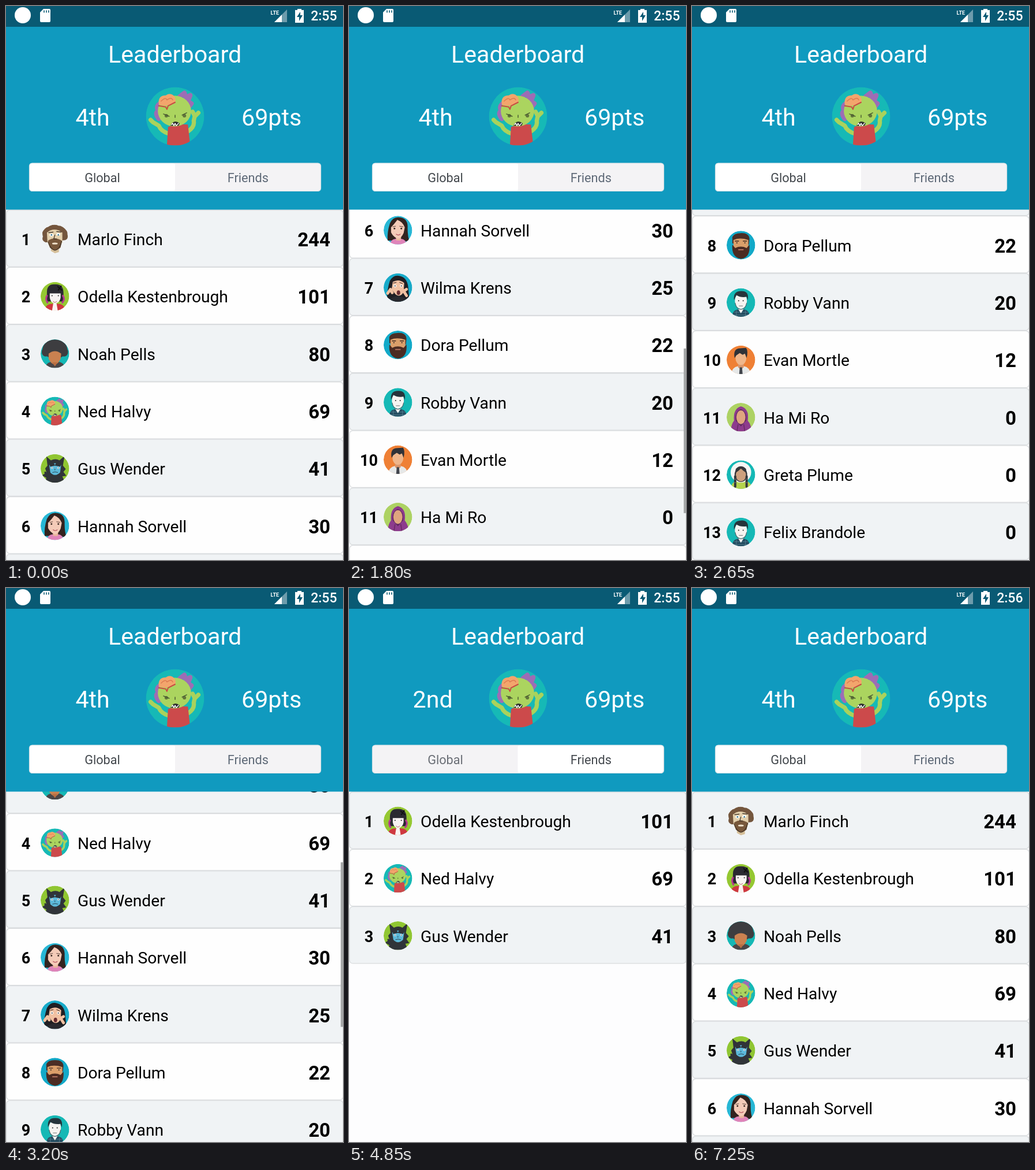
Write an HTML page that moves like this. It is 584 px wide and 959 px high and loops after 8000 ms.

```html
<!DOCTYPE html>
<html lang="en">
<head>
<meta charset="utf-8">
<title>Leaderboard</title>
<style>
  html, body { margin: 0; width: 100%; height: 100%; overflow: hidden; background: #fdfdfe; }
  svg { display: block; width: 584px; height: 959px; font-family: Roboto, sans-serif; }
  .big { font-size: 41.2px; fill: #fff; }
  .tab { font-size: 21.7px; text-anchor: middle; }
  .name { font-size: 28.2px; }
  .rank { font-size: 27px; font-weight: 700; text-anchor: middle; }
  .score { font-size: 33px; font-weight: 700; text-anchor: end; }
</style>
</head>
<body>
<svg id="stage" viewBox="0 0 584 959"></svg>
<script>
const TOP = 352.5, PITCH = 99.3, VIEW = 959 - TOP, LOOP = 8000;

const oval = (x, y, rx, ry, fill) => `<ellipse cx="${x}" cy="${y}" rx="${rx}" ry="${ry}" fill="${fill}"/>`;
const shape = (d, fill) => `<path d="${d}" fill="${fill}"/>`;
const line = (d, color, width) =>
  `<path d="${d}" fill="none" stroke="${color}" stroke-width="${width}" stroke-linecap="round" stroke-linejoin="round"/>`;
const box = (x, y, w, h, fill, extra = '') =>
  `<rect x="${x}" y="${y}" width="${w}" height="${h}" fill="${fill}" ${extra}/>`;
const label = (x, y, cls, text, extra = '') => `<text x="${x}" y="${y}" class="${cls}" ${extra}>${text}</text>`;
const disc = fill => oval(25, 25, 25, 25, fill);
const eyes = (x1, x2, y, fill = '#222', r = 1) => oval(x1, y, r, r, fill) + oval(x2, y, r, r, fill);

// Avatars live in a 50 x 50 box.
const checkedShirt = disc('#15b8b5') + shape('M10 50Q10 38 20 37L30 37Q40 38 40 50Z', '#244c60') +
  line('M13 42H37M13 47H37M17 39V50M33 39V50', '#5d8797', .8) + shape('M20 36L30 36 25 44Z', '#f4f4f2') +
  oval(25, 22, 10.5, 14, '#f6f4f1') + shape('M13 21Q11 5 25 5Q40 4 37 21L35 15Q25 17 17 12Z', '#27343b') +
  line('M15 26Q17 37 25 37Q33 37 35 26', '#53636a', 1.2) + eyes(21, 29, 22) + line('M22 31H28', '#777', 1);

const avatars = {
  wild: shape('M4 21Q0 5 13 4Q22 -3 32 2Q47 0 47 17Q49 25 43 27L9 31Q1 28 4 21Z', '#74563d') +
    shape('M18 35H32V48L25 50 18 46Z', '#d5bf99') + shape('M11 14Q24 3 38 14L38 31Q33 43 25 44Q16 43 12 31Z', '#e3d0ac') +
    shape('M13 28Q24 20 37 28L35 40Q25 49 16 40Z', '#78583b') + oval(25, 33, 5, 1.7, '#eee0c9') +
    oval(19, 18, 3.4, 2.4, '#fff') + oval(31, 17, 3.4, 2.4, '#fff') + eyes(19, 31, 18, '#256c86', 1.3) +
    line('M14 14L22 13M28 12L36 13M25 18L23 25H28M13 30Q17 43 25 45Q34 43 37 29', '#332820', 1.1),
  bob: disc('#95c832') + shape('M11 34V18Q11 3 25 4Q40 3 40 19V34Z', '#2b2a31') +
    line('M11 24Q8 30 12 36M39 24Q43 30 38 36', '#b83791', 3) + shape('M7 50Q8 38 21 38H30Q42 38 43 50Z', '#cf3840') +
    shape('M16 17H35V27Q34 36 25 38Q17 36 16 27Z', '#f8f3f2') + shape('M15 20V12H36V20Z', '#2b2a31') +
    shape('M20 50L22 38Q25 33 28 38L30 50Z', '#faf4f2') + eyes(20, 31, 24) + line('M22 34L25 36 28 34', '#bd5f69', 1) +
    line('M30 8L37 14M36 7L31 14', '#111', 2),
  afro: disc('#15b8b5') + shape('M8 50Q10 39 22 39H30Q41 40 43 50Z', '#4a4648') + oval(25, 17, 21.5, 16.5, '#3d3d40') +
    oval(9, 22, 7, 8, '#3d3d40') + oval(41, 22, 7, 8, '#3d3d40') +
    shape('M14 25Q25 16 36 25L35 34Q30 44 25 44Q18 43 14 34Z', '#ca8150') + shape('M20 40H30L25 47Z', '#b96f42'),
  zombie: disc('#16b9b6') + line('M12 14Q8 17 11 20Q7 22 11 27M29 8L33 5 34 9 38 7 36 12 39 14 36 18', '#9d6db5', 4) +
    line('M20 40Q13 38 11 33L6 30M36 38Q42 34 41 29L42 24M42 25L45 22M42 25L40 21M6 30L4 28', '#a9d25c', 3.6) +
    shape('M19 34Q27 31 36 32L38 50H18Z', '#cc4a4b') + oval(24.5, 20.5, 14.3, 13.2, '#abd45f') +
    shape('M11 15Q10 7 17 7Q22 4 25 9Q27 13 21 15L16 16Z', '#f3a56c') +
    line('M13 12Q17 8 18 11Q22 8 23 11', '#dd7c51', .7) + line('M11 16L17 17 18 19 19 16 25 13', '#c94c43', 1) +
    eyes(17.5, 33, 24.5, '#62753b', 1.5) + line('M15 23L20 25M31 24L35 22M25 24V26', '#485931', .7) +
    shape('M21 33Q24 27 29 31L28 33Z', '#2c2d2d') + line('M22 32L23 31 24 33 25 31 26 33 28 31', '#fff', .7),
  wolf: disc('#90c632') + shape('M7 50L11 39 4 37 10 31 8 25 12 20 10 4 18 11Q26 7 33 11L42 3 39 20 44 26 40 31 45 38 38 39 43 50Z', '#303439') +
    shape('M15 19Q25 13 36 19L34 32Q25 41 17 32Z', '#5cb9d9') + shape('M15 18L21 13 25 19 29 13 36 19 34 22 25 20 17 22Z', '#303439') +
    eyes(20, 31, 24, '#fff', 1.8) + eyes(20, 31, 24, '#222', .8) + line('M21 32Q25 30 30 32M25 26V28', '#294657', 1) +
    line('M8 32L14 42M5 37L12 41', '#303439', 3),
  long: disc('#27b7d5') + shape('M7 43Q6 28 11 13Q17 0 30 3Q43 5 42 22Q42 37 46 46L34 43H15Z', '#33231f') +
    shape('M11 50Q12 41 21 40H31Q39 41 40 50Z', '#df84b9') + shape('M21 34H31L30 43H22Z', '#eab69e') +
    shape('M13 20Q18 15 24 7Q33 10 37 20L35 30Q31 39 25 40Q17 37 13 29Z', '#f4cbb8') +
    eyes(19, 31, 22, '#3b2923', 1.5) + line('M16 19L21 18M28 18L34 19', '#49322b', .9) + line('M22 32Q26 35 29 32', '#b95863', 1.3),
  shout: disc('#17aac9') + shape('M6 45Q6 28 11 13Q18 1 29 5Q41 8 43 24L45 46Z', '#201f23') +
    shape('M9 50Q13 40 25 40Q38 41 42 50Z', '#292a2f') + shape('M16 15Q27 9 36 17L35 33Q29 43 21 37L14 28Z', '#f1c1a2') +
    line('M7 35L12 28 15 34M40 39L35 31 40 28', '#f1c1a2', 5) + eyes(20, 31, 22, '#fff', 2.5) + eyes(20, 31, 22) +
    oval(26, 34, 3, 4, '#682c30') + line('M17 17L22 16M28 16L33 18', '#2c2020', 1),
  beard: disc('#12a9c8') + shape('M10 22V11Q13 4 24 4Q39 3 40 14L39 24Z', '#4b2e25') +
    shape('M12 16Q23 11 38 16V33H12Z', '#db9f6a') + shape('M10 24L15 30Q25 25 35 30L40 24Q42 47 25 49Q8 46 10 24Z', '#4b2b22') +
    eyes(18, 32, 21) + line('M15 18H21M29 18H35', '#412820', 1.4) + line('M21 33H29', '#bd7865', 1.8),
  checked: checkedShirt,
  tie: disc('#ef8035') + shape('M8 50Q9 38 20 36H30Q41 38 42 50Z', '#e6e8e8') + shape('M20 29H30V38L25 42 20 38Z', '#d8966d') +
    oval(25, 22, 9.5, 12, '#efb68b') + shape('M14 22Q11 7 21 5L34 4Q38 9 35 22L32 14 28 16 23 13 17 17Z', '#303237') +
    shape('M23 38H27L28 50H22Z', '#41454c'),
  hood: disc('#add263') + shape('M7 50Q8 37 13 31Q11 10 25 6Q40 10 37 31Q43 38 44 50Z', '#8d3b8d') +
    shape('M16 31Q14 15 25 11Q36 15 34 31L25 41Z', '#5f285e') + oval(25, 25, 8, 12, '#dfa47f') +
    line('M20 38L18 50M30 38L32 50', '#672960', 1.5),
  braids: disc('#15b8b5') + shape('M7 50Q9 36 20 36H31Q42 36 45 50Z', '#b4d34d') +
    oval(25, 21, 18, 18, '#f6f6f4') + oval(25, 25, 11, 13, '#34363a') + oval(25, 26, 9, 11, '#cda07d') +
    shape('M15 22Q23 18 25 13Q27 18 35 22L34 15Q25 6 16 15Z', '#34363a') +
    line('M15 28V46M35 28V46', '#34363a', 4) + line('M13 33H17M33 33H37M13 39H17M33 39H37', '#727277', 1)
};
const avatar = (look, x, y, scale) =>
  `<g transform="translate(${x} ${y}) scale(${scale})" clip-path="url(#round)">${avatars[look]}</g>`;

const players = [
  ['Marlo Finch', 244, 'wild'], ['Odella Kestenbrough', 101, 'bob'], ['Noah Pells', 80, 'afro'],
  ['Ned Halvy', 69, 'zombie'], ['Gus Wender', 41, 'wolf'], ['Hannah Sorvell', 30, 'long'],
  ['Wilma Krens', 25, 'shout'], ['Dora Pellum', 22, 'beard'], ['Robby Vann', 20, 'checked'],
  ['Evan Mortle', 12, 'tie'], ['Ha Mi Ro', 0, 'hood'], ['Greta Plume', 0, 'braids'], ['Felix Brandole', 0, 'checked']
];
const friends = [1, 3, 4].map(i => players[i]);

const row = ([name, score, look], i) => `<g transform="translate(0 ${TOP + i * PITCH})">` +
  box(.7, .5, 583.6, 98.3, i % 2 ? '#fefefe' : '#f0f3f5', 'rx="6" stroke="#d9dcde" stroke-width="1.3"') +
  label(34.5, 61.5, 'rank', i + 1) + avatar(look, 60, 26, .99) +
  label(124, 61.5, 'name', name) + label(562, 63.5, 'score', score) + '</g>';

const stage = document.getElementById('stage');
stage.innerHTML = `<defs><clipPath id="round"><circle cx="25" cy="25" r="25"/></clipPath></defs>` +
  box(0, 0, 584, 959, '#fdfdfe') +
  `<g id="global">${players.map(row).join('')}</g><g id="friends">${friends.map(row).join('')}</g>` +
  box(580, TOP, 4, VIEW * VIEW / (PITCH * players.length), '#a6a8a9', 'id="bar"') +
  box(0, 0, 584, TOP, '#109abf') + box(0, 0, 584, 36, '#095a74') +
  // status bar
  oval(29, 16, 14, 14, '#fff') +
  shape('M65 5H75Q77 5 77 7V26Q77 28 75 28H61Q59 28 59 26V11Z', '#fff') +
  line('M66 8V11M70 8V11M74 8V11', '#095a74', 1.6) +
  label(458.5, 14.5, '', 'LTE', 'font-size="9" font-weight="700" fill="#fff"') +
  shape('M487 6V28H465Z', '#6d9cac') + shape('M478 15V28H465Z', '#fff') +
  shape('M505 5H512V7H516V29H501V7H505Z', '#fff') + shape('M510 10L504 19H508V26L514 16H510Z', '#095a74') +
  label(573.5, 25, '', '', 'id="clock" font-size="23" font-weight="500" text-anchor="end" fill="#fff"') +
  // header
  label(292.7, 98, 'big', 'Leaderboard', 'text-anchor="middle"') +
  label(179.7, 207, 'big', '', 'id="place" text-anchor="end"') + label(408, 207, 'big', '69pts') +
  avatar('zombie', 242.5, 140.5, 2.02) +
  box(40.5, 272, 505, 48.5, '#f4f3f5', 'rx="5"') +
  box(41, 272, 252, 48.5, '#fff', 'id="active" rx="4"') +
  box(40.5, 272, 505, 48.5, 'none', 'rx="5" stroke="#d9e3e7" stroke-width="1.2"') +
  label(167, 305, 'tab', 'Global', 'id="tabGlobal"') + label(419.3, 305, 'tab', 'Friends', 'id="tabFriends"');

const el = Object.fromEntries([...stage.querySelectorAll('[id]')].map(n => [n.id, n]));
const rows = el.global.children;
const maxScroll = PITCH * players.length - VIEW;
const clamp = v => Math.min(1, Math.max(0, v));
const ramp = (t, from, to) => clamp((t - from) / (to - from));
const easeInOut = p => p < .5 ? 2 * p * p : 1 - 2 * (1 - p) ** 2;

// Pressed rows dim at once and recover over 250 ms after release.
const pressed = (t, down, up) => t < down ? 1 : .2 + .8 * easeInOut(ramp(t, up, up + 250));

function scrollAt(t) {
  if (t < 3000) return maxScroll * (1 - (1 - ramp(t, 1600, 2030)) ** 2.2);
  return maxScroll * (1 - ramp(t, 3000, 3300) ** 1.18);
}

function barOpacity(t) {
  if (t > 1600 && t < 2450) return 1 - ramp(t, 2250, 2450);
  if (t > 3000 && t < 3850) return 1 - ramp(t, 3600, 3850);
  return 0;
}

function render(now) {
  const t = Math.floor(now % LOOP / 50) * 50;
  const isFriends = t >= 3950 && t < 7250;
  const scroll = scrollAt(t);

  el.global.style.display = isFriends ? 'none' : '';
  el.friends.style.display = isFriends ? '' : 'none';
  el.global.setAttribute('transform', `translate(0 ${-scroll})`);
  rows[4].style.opacity = pressed(t, 1600, 1650);
  rows[0].style.opacity = pressed(t, 3250, 3300);

  el.bar.setAttribute('y', TOP + scroll * VIEW / (PITCH * players.length));
  el.bar.style.opacity = barOpacity(t);

  el.place.textContent = isFriends ? '2nd' : '4th';
  el.clock.textContent = t < 5800 ? '2:55' : '2:56';
  el.active.setAttribute('x', isFriends ? 292.5 : 41);
  el.tabGlobal.setAttribute('fill', isFriends ? '#6b6f76' : '#43484d');
  el.tabFriends.setAttribute('fill', isFriends ? '#43484d' : '#5e6977');
}

const start = performance.now();
function tick() {
  render(performance.now() - start);
  requestAnimationFrame(tick);
}
tick();
</script>
</body>
</html>
```
